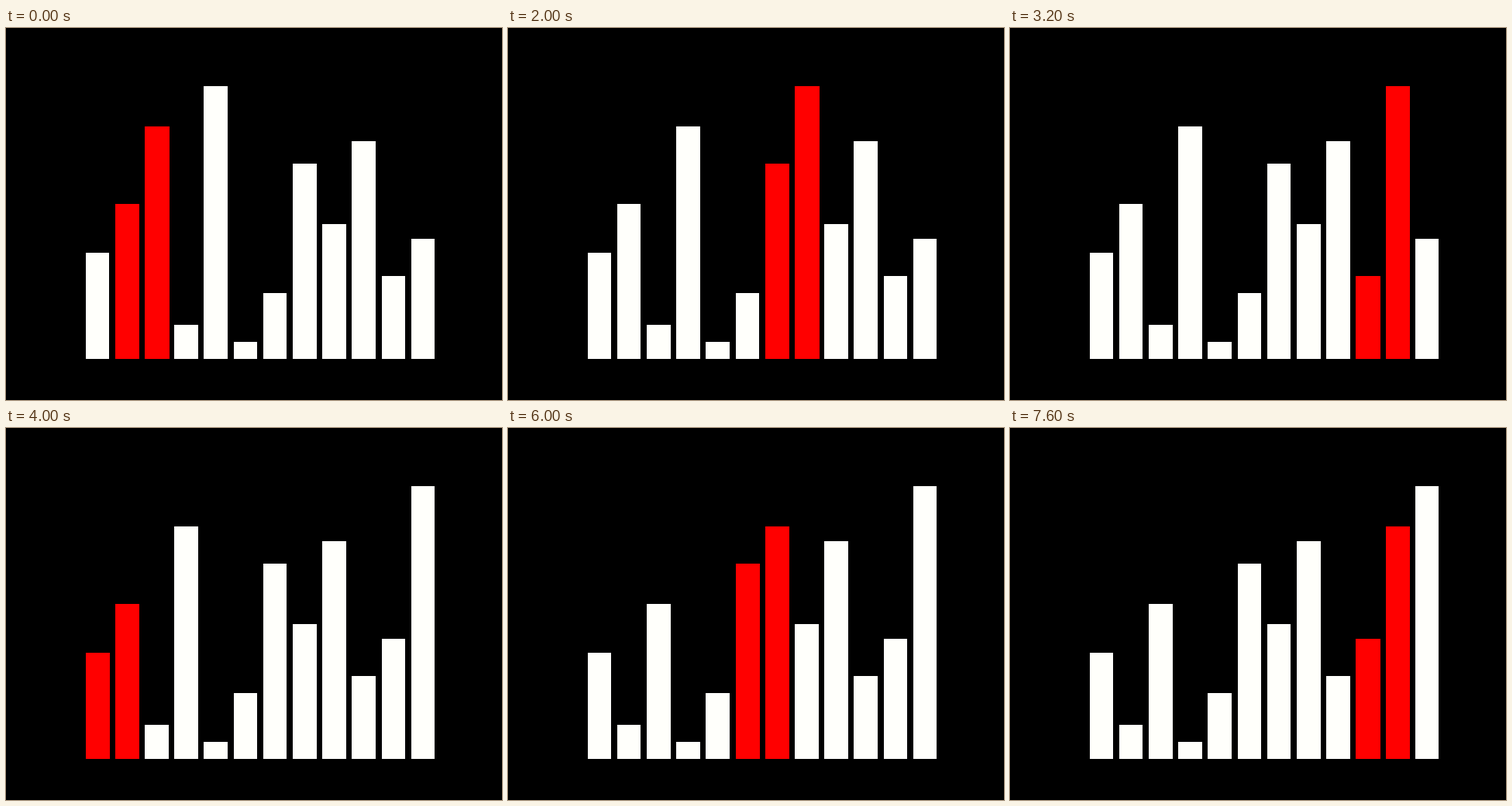
These frames come from a looping animation (640 by 480 pixels, 8000 ms). An HTML page:

```html
<!DOCTYPE html>
<html lang="en">
<head>
<meta charset="utf-8">
<title>Bubble sort</title>
<style>
  html, body { margin: 0; width: 100%; height: 100%; overflow: hidden; background: #000; }
  svg { display: block; width: 100%; height: 100%; }
</style>
</head>
<body>
<svg id="stage" viewBox="0 0 640 480" shape-rendering="crispEdges"></svg>
<script>
const STEP = 400, STEPS = 20, BASE = 427;
const WHITE = '#fffffb', RED = '#ff0000';
const START = [137, 200, 300, 44, 352, 22, 85, 252, 174, 281, 107, 155];
const COUNT = START.length;

const stage = document.getElementById('stage');
const bars = START.map(() =>
  stage.appendChild(document.createElementNS('http://www.w3.org/2000/svg', 'rect')));

// Bubble sort: each state holds the heights after comparing the pair at `at`.
function sortStates() {
  const states = [], h = START.slice();
  let at = 1, last = COUNT - 1;
  while (states.length < STEPS) {
    if (h[at] > h[at + 1]) [h[at], h[at + 1]] = [h[at + 1], h[at]];
    states.push({ heights: h.slice(), at });
    if (++at >= last) { at = 0; last--; }
  }
  return states;
}
const states = sortStates();

function draw(time) {
  const { heights, at } = states[Math.floor(time / STEP) % STEPS];
  bars.forEach((bar, i) => {
    const active = i === at || i === at + 1;
    const left = 103 + 38.2 * i;
    const x = Math.floor(left + 0.001);
    const right = Math.floor(left + 30.7) + (active ? 1 : 0);
    bar.setAttribute('x', x);
    bar.setAttribute('width', right - x);
    bar.setAttribute('y', BASE - heights[i]);
    bar.setAttribute('height', heights[i]);
    bar.setAttribute('fill', active ? RED : WHITE);
  });
}

const began = performance.now();
function tick() {
  draw(performance.now() - began);
  requestAnimationFrame(tick);
}
tick();
</script>
</body>
</html>
```
